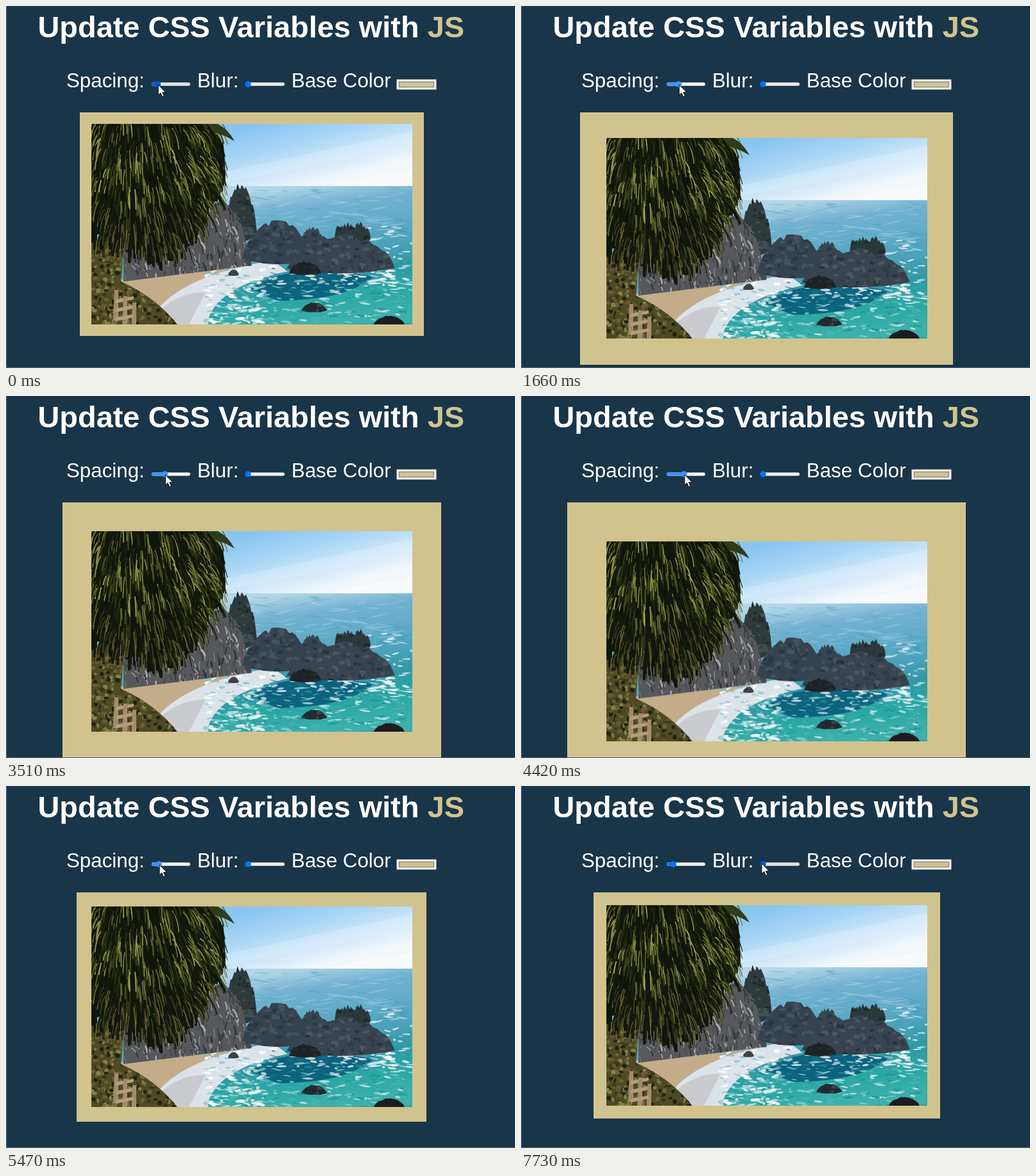
Write an HTML page with a canvas that moves like this. It is 793 px wide and 565 px high and loops after 7990 ms.

```html
<!DOCTYPE html>
<html lang="en">
<head>
<meta charset="utf-8">
<title>Update CSS Variables with JS</title>
<style>
  :root { --base: #d1c38e; --pad: 18px; }
  html, body { margin: 0; width: 100%; height: 100%; overflow: hidden; background: #193549; }
  #stage { position: relative; width: 793px; height: 565px; overflow: hidden; }
  #frame {
    position: absolute; top: 166px; left: calc(132.8px - var(--pad));
    padding: var(--pad); background: var(--base);
  }
  canvas { display: block; width: 500px; height: 312.8px; }
  svg { position: absolute; inset: 0; font-family: "Liberation Sans", Arial, sans-serif; fill: #fff; }
  .title { font-size: 46.9px; font-weight: bold; }
  .label { font-size: 31.3px; }
  .slider { --accent: #0075ff; --track: #efefef; }
  .slider.hover { --accent: #0159cf; --track: #e5e5e5; }
  .slider.active { --accent: #3793ff; --track: #f5f5f5; }
  .track { fill: var(--track); stroke: #b2b2b2; stroke-width: .6; }
  .fill, .thumb { fill: var(--accent); }
</style>
</head>
<body>
<div id="stage">
  <div id="frame"><canvas width="500" height="313"></canvas></div>
  <svg width="793" height="565" viewBox="0 0 793 565">
    <text class="title" x="49.5" y="49">Update CSS Variables with <tspan fill="#d1c38e">JS</tspan></text>
    <g class="label">
      <text x="94" y="127">Spacing:</text>
      <text x="298" y="127">Blur:</text>
      <text x="444.8" y="127">Base Color</text>
    </g>
    <g id="spacing" class="slider">
      <rect class="track" x="227" y="119.5" width="60" height="5" rx="2.5"/>
      <rect class="fill" x="227" y="119.5" width="9" height="5" rx="2.5"/>
      <circle class="thumb" cx="236" cy="122" r="4.7"/>
    </g>
    <g id="blur" class="slider">
      <rect class="track" x="374" y="119.5" width="60" height="5" rx="2.5"/>
      <circle class="thumb" cx="377" cy="122" r="4.7"/>
    </g>
    <rect x="608.5" y="114.5" width="62" height="16" rx="1" fill="#efefef" stroke="#858585"/>
    <rect x="612.5" y="118.5" width="54" height="8" fill="#d1c38e" stroke="#777"/>
    <path d="M0 0H1V565H0Z" fill="#64727c"/>
    <path d="M0 564H793V565H0Z" fill="#526370"/>
    <path id="cursor" d="M0 0V16L3.7 12.6 6.3 18.7 9 17.6 6.4 11.7H11.5Z" stroke="#000" stroke-width=".9"/>
  </svg>
</div>
<script>
const LOOP = 7990, TICK = 132, FIRST_DRAG = 1110, UNIT = 2.245;
const PRESS = -3, RELEASE = 41;

// Key points: [tick, spacing value]
const drag = [
  [-1, 8], [0, 10], [4, 18], [5, 19], [9, 19], [11, 14], [14, 10],
  [16, 10], [18, 20], [21, 30], [22, 31], [23, 31], [33, 10], [35, 10], [36, 9]
];
// Key points: [tick, x, y]
const glide = [[RELEASE, 313, 67], [42, 338, 29], [45, 395, 123], [47, 367, 114], [48, 367, 114], [50, 375, 121]];

const $ = s => document.querySelector(s);
const spacing = $('#spacing'), blur = $('#blur'), cursor = $('#cursor');
const fill = $('#spacing .fill'), thumb = $('#spacing .thumb');
const setState = (el, state) => el.setAttribute('class', 'slider ' + state);

function along(keys, tick) {
  const next = keys.findIndex(k => k[0] > tick);
  if (next < 1) return keys.at(next).slice(1);
  const a = keys[next - 1], b = keys[next];
  const u = (tick - a[0]) / (b[0] - a[0]);
  return a.slice(1).map((v, i) => v + (b[i + 1] - v) * u);
}

function render(t) {
  const tick = Math.floor((t - FIRST_DRAG) / TICK + .15);
  const value = Math.round(along(drag, tick)[0]);
  const knob = 229 + value * .93;
  const [x, y] = tick < RELEASE ? [knob + .8, 123] : along(glide, tick);
  document.documentElement.style.setProperty('--pad', value * UNIT + 'px');
  thumb.setAttribute('cx', knob);
  fill.setAttribute('width', knob - 227);
  setState(spacing, tick < PRESS ? 'hover' : tick < RELEASE ? 'active' : '');
  setState(blur, tick >= 45 && x > 370 ? 'hover' : '');
  cursor.setAttribute('transform', `translate(${x} ${y})`);
}

function paintBeach() {
  const c = $('canvas').getContext('2d');
  let seed = 7;
  const rnd = (a = 0, b = 1) => {
    seed = (seed * 16807) % 2147483647;
    return a + (b - a) * seed / 2147483647;
  };
  const pick = list => list[Math.floor(rnd(0, list.length))];
  const shape = (d, color) => { c.fillStyle = color; c.fill(new Path2D(d)); };
  const vertical = (y0, y1, ...colors) => {
    const g = c.createLinearGradient(300, y0, 330, y1);
    colors.forEach((color, i) => g.addColorStop(i / (colors.length - 1), color));
    return g;
  };
  const within = (d, draw) => { c.save(); c.clip(new Path2D(d)); draw(); c.restore(); };
  const flecks = (count, [x0, y0, x1, y1], [w, h], colors) => {
    for (let i = 0; i < count; i++) {
      c.fillStyle = pick(colors);
      c.beginPath();
      c.ellipse(rnd(x0, x1), rnd(y0, y1), rnd(w / 4, w), rnd(h / 3, h), rnd(-.3, .3), 0, 7);
      c.fill();
    }
  };
  const strand = (x, y, dx, dy, width, color) => {
    c.strokeStyle = color;
    c.lineWidth = width;
    c.beginPath();
    c.moveTo(x, y);
    c.quadraticCurveTo(x + dx * .8, y + dy * .35, x + dx, y + dy);
    c.stroke();
  };
  // A rugged rock between two shores, speckled with its own tones
  const mound = (x0, x1, top, base, tones) => {
    const h = base - top, bulge = Math.sin, points = [];
    for (let i = 0; i <= 24; i++) {
      const u = i / 24;
      points.push([x0 + (x1 - x0) * u, base - h * bulge(Math.PI * u) ** .6 * rnd(.86, 1.02)]);
    }
    const d = `M${points.join('L')}Q${(x0 + x1) / 2} ${base + h * .3} ${x0} ${base}Z`;
    shape(d, tones[0]);
    within(d, () => flecks((x1 - x0) * h / 55, [x0, top, x1, base + 8], [6, 4], tones));
  };

  // Sky
  shape('M0 0H500V100H0Z', vertical(-10, 100, '#88c5f0', '#a3d3f5', '#cae5f9', '#f2f7fb'));
  shape('M205 75L500 12V36L205 92Z', '#e2f1fb50');
  shape('M385 93Q440 78 500 72V97H385Z', '#fbfdfeb0');

  // Sea
  shape('M0 97H500V313H0Z', vertical(97, 313, '#b5d7e8', '#72b2d0', '#63acc9', '#4ca3bb', '#2f98a5', '#2aa7a4', '#3bb0ac'));
  flecks(90, [240, 101, 500, 165], [20, 1.2], ['#8fc4dc80', '#539fc280', '#b7dbea70']);
  shape('M248 258Q300 215 440 238 400 275 290 276Z', '#0b637e');
  flecks(130, [400, 160, 500, 258], [9, 2], ['#eef6f9cc', '#d3e7eecc', '#489fb599']);
  flecks(240, [190, 244, 500, 313], [9, 1.8], ['#e8f4f5b0', '#a9dcd9a0', '#13858c80', '#52bdb680']);

  // Beach and surf
  shape('M45 243L228 224Q130 250 142 313H70Z', '#c4ac8a');
  shape('M104 288Q150 235 282 213L306 230Q190 255 180 313H132Z', '#dbe2e8');
  shape('M110 288Q140 262 178 263L152 313H132Z', '#c9cbcf');
  flecks(150, [178, 226, 270, 313], [8, 2.5], ['#ffffffd0', '#e1ecf0c0', '#79bcc6a0']);
  flecks(100, [262, 213, 470, 250], [9, 2.2], ['#ffffffc0', '#d5e6edc0', '#1b6f8aa0']);

  // Cliffs and rocks
  mound(206, 258, 92, 172, ['#2e3a3c', '#1f2b2d', '#435052']);
  const cliff = 'M50 165L150 150 205 118 232 150 250 221 50 246Z';
  shape(cliff, '#56585b');
  within(cliff, () => {
    for (let i = 0; i < 320; i++) {
      strand(rnd(45, 248), rnd(115, 235), rnd(-3, 8), rnd(4, 16), rnd(.8, 3),
        pick(['#303438', '#3e4348', '#85868a', '#b0afaf', '#44484c']));
    }
  });
  mound(320, 368, 160, 202, ['#374550', '#2a3945', '#47525a']);
  mound(235, 345, 150, 210, ['#35434e', '#283845', '#475157']);
  for (let x = 384; x < 430; x += 5) {
    mound(x - 5, x + 6, rnd(152, 162), 180, ['#2b393b', '#1f2c2e']);
  }
  mound(305, 473, 170, 225, ['#38444f', '#27333f', '#4c555e', '#303d49']);
  mound(308, 358, 214, 233, ['#1d2324', '#262d2e']);
  mound(327, 367, 278, 292, ['#222a30', '#38434a']);
  mound(440, 488, 299, 313, ['#1c1c20', '#2b2a2d']);
  mound(213, 230, 227, 236, ['#3f4143']);

  // Undergrowth and fence
  const scrub = 'M0 180H52L46 246Q100 270 134 313H0Z';
  shape(scrub, '#4d4a25');
  within(scrub, () => flecks(420, [0, 185, 130, 313], [4, 4], ['#202310', '#67662e', '#838048', '#37381a', '#6e5a38']));
  for (let i = 0; i < 3; i++) {
    shape(`M${36 + i * 14} ${259 + i * 10}h6v48h-8z`, '#a28b6c');
    shape(`M38 ${274 + i * 14}l28 -5v5l-28 6z`, '#b59d7b');
  }

  // Palm: a ragged dark canopy under clustered light strands
  const reach = x => x < 112 ? 200 + x * .25 : 228 - (x - 112) ** 2 * .0151;
  for (let x = -4; x < 208; x += 2) {
    const top = Math.max(0, (x - 190) * 1.7);
    strand(x - 3, top, 4, reach(x) * rnd(.84, 1.02) - top, 4, '#12170d');
  }
  const light = ['#6d742f', '#8b8d45', '#535b20', '#a3a25c', '#3f4a18'];
  const dark = ['#0e130a', '#1c250d', '#2c3613', '#10150b'];
  const dry = ['#3a3d1b', '#5d5a2c', '#0e130a', '#1d210f', '#77693a'];
  for (let i = 0; i < 900; i++) {
    const x = rnd(-5, 194), room = reach(Math.max(x, 0)), y = rnd(-12, room - 25);
    const lit = Math.sin(x * .24 - y * .07) + Math.sin(y * .09 + x * .05) > rnd(-.9, .9);
    const len = Math.min(rnd(14, 36), room + 6 - y);
    const lean = (x - 65) * len * .0052 + rnd(-3, 3);
    strand(x, y, Math.min(lean, 212 - x), len, rnd(.7, 2), pick(y > 125 ? dry : lit ? light : dark));
  }
  shape('M180 0H197Q213 8 223 27 207 17 193 14Z', '#303b19');
}

paintBeach();
const start = performance.now();
(function tick() {
  render((performance.now() - start) % LOOP);
  requestAnimationFrame(tick);
})();
</script>
</body>
</html>
```
